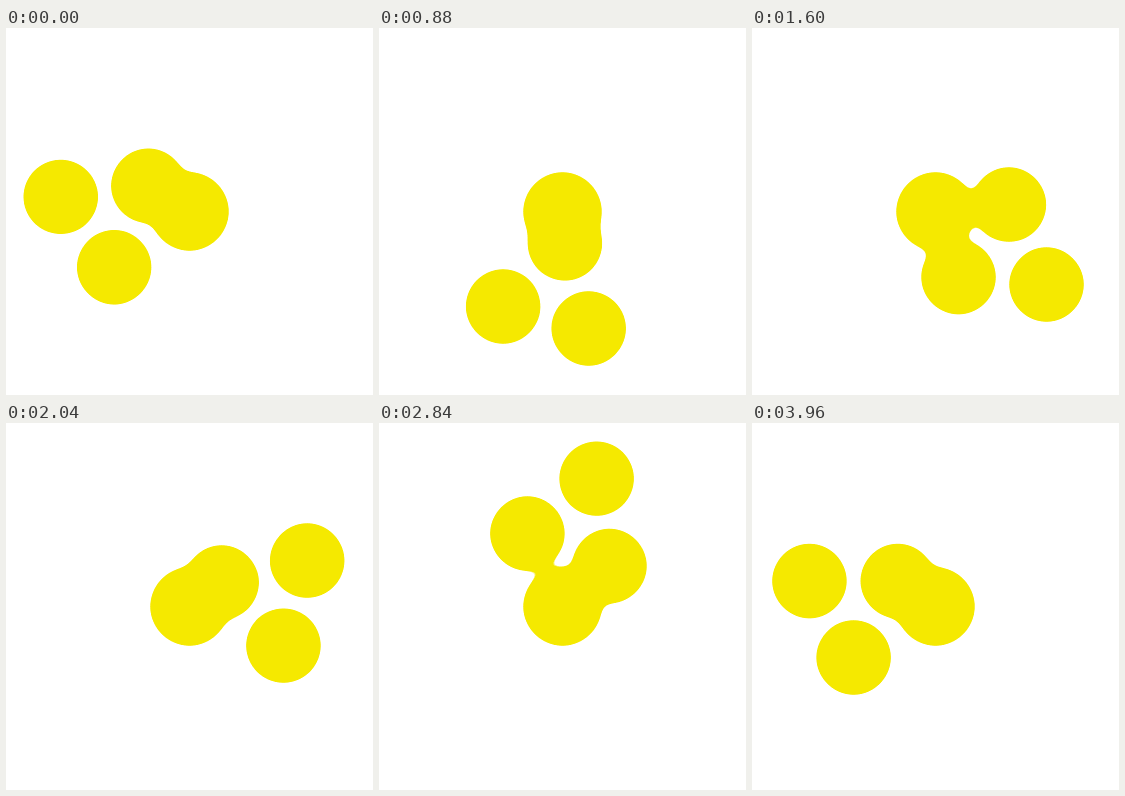
Write an HTML page that moves like this. It is 367 px wide and 367 px high and loops after 4000 ms.

```html
<!DOCTYPE html>
<html lang="en">
<head>
<meta charset="utf-8">
<title>Orbiting blobs</title>
<style>
  html, body { margin: 0; width: 100%; height: 100%; overflow: hidden; background: #fff; }
  svg { display: block; width: 100%; height: 100%; }
</style>
</head>
<body>
<svg viewBox="0 0 367 367">
  <defs>
    <!-- Blur, then harden the alpha so nearby discs melt together -->
    <filter id="goo" filterUnits="userSpaceOnUse" x="0" y="0" width="367" height="367" color-interpolation-filters="sRGB">
      <feGaussianBlur stdDeviation="6.5" result="soft"/>
      <feComponentTransfer in="soft" result="hard">
        <feFuncA type="linear" slope="20" intercept="-7.5"/>
      </feComponentTransfer>
      <feFlood flood-color="#f5e900"/>
      <feComposite in2="hard" operator="in"/>
    </filter>
  </defs>
  <g filter="url(#goo)" fill="#f5e900">
    <circle cx="183.5" cy="183.5" r="38.2"/>
    <circle class="moon" r="36.2"/>
    <circle class="moon" r="36.2"/>
    <circle class="moon" r="36.2"/>
  </g>
</svg>
<script>
  const LOOP = 4000, CENTER = 183.5, ORBIT = 81.9, SPREAD = 51;
  const TURN = 2 * Math.PI;
  const moons = document.querySelectorAll('.moon');

  // The trio circles the hub once per loop while spinning twice about its own middle.
  function draw(ms) {
    const p = ((ms + 40) % LOOP) / LOOP;
    const orbit = TURN * (0.5 - p);
    const x = CENTER + ORBIT * Math.cos(orbit);
    const y = CENTER + ORBIT * Math.sin(orbit);
    moons.forEach((moon, i) => {
      const spin = TURN * (0.25 - 2 * p + i / 3);
      moon.setAttribute('cx', (x + SPREAD * Math.cos(spin)).toFixed(3));
      moon.setAttribute('cy', (y + SPREAD * Math.sin(spin)).toFixed(3));
    });
  }

  let start;
  function tick(now) {
    start ??= now;
    draw(now - start);
    requestAnimationFrame(tick);
  }
  draw(0);
  requestAnimationFrame(tick);
</script>
</body>
</html>
```
